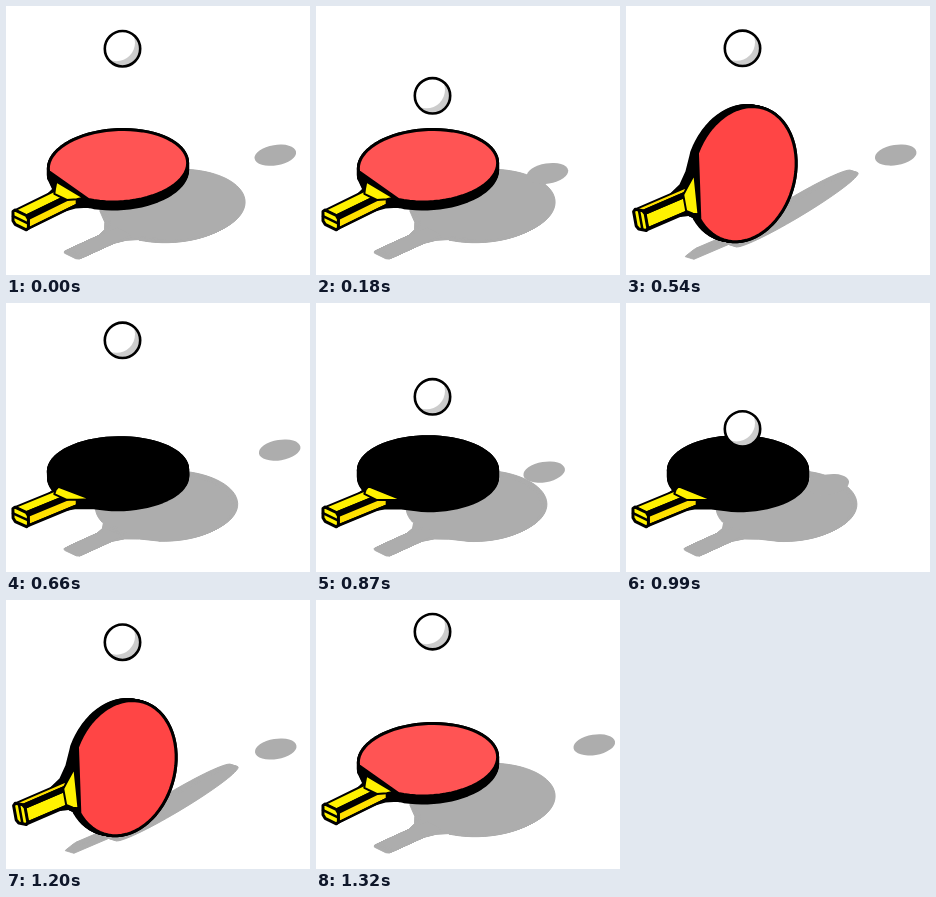
Recreate the animation shown at these times as an HTML page with a canvas. Size 304 px wide and 269 px high, loop 1350 ms.

```html
<!DOCTYPE html>
<html lang="en">
<head>
<meta charset="utf-8">
<title>Bouncing ball</title>
<style>
html, body { margin: 0; width: 100%; height: 100%; overflow: hidden; background: #fff; }
canvas { display: block; }
</style>
</head>
<body>
<canvas id="stage" width="304" height="269"></canvas>
<script>
const ctx = document.getElementById('stage').getContext('2d');
const LOOP = 1350, STEP = 30;
const SHADOW = '#adadad', YELLOW = '#fff200', GOLD = '#ffe000';
const GRAVITY = 0.00094, RADIUS = 70, HALF = 4.2, END = -139;
let angle = 0;

// Bat coordinates: u along the handle, v across it, w through the thickness.
function turn([u, v, w]) {
  const c = Math.cos(angle), s = Math.sin(angle);
  const lift = w + 0.032 * (u - END);
  return { u, side: v * c + lift * s, up: 0.84 * (lift * c - v * s) };
}
const bend = u => Math.min(0, u + RADIUS) * 0.045;

function toScreen(p) {
  const { u, side, up } = turn(p);
  return [112 + 0.7 * (u + side), 167 - 0.36 * u + 0.34 * side - up + bend(u)];
}

function toGround(p) {
  const { u, side, up } = turn(p);
  return [163.5 + 0.69 * (u + side) + 0.806 * up,
          201.4 - 0.36 * u + 0.34 * side - 0.39 * up + bend(u)];
}

// The round blade, cut straight where it meets the neck.
const blade = Array.from({ length: 61 }, (_, i) => {
  const a = (-140 + i * 5) * Math.PI / 180;
  return [RADIUS * 1.01 * Math.cos(a), RADIUS * Math.sin(a)];
});
const neck = [[-58, 36], [-66, 23], [-76, 15], [-90, 11], [-90, -11], [-76, -16], [-65, -27], [-57, -40]];
const body = [...blade, ...neck];
const grip = [[END + 2, -11], [-72, -11], [-72, 11], [END + 2, 11], [END, 8], [END, -8]];
const at = (shape, w) => shape.map(([u, v]) => [u, v, w]);

function draw(points, project, fill, stroke, width = 2.6) {
  ctx.beginPath();
  points.forEach(p => ctx.lineTo(...project(p)));
  ctx.closePath();
  if (fill) { ctx.fillStyle = fill; ctx.fill(); }
  if (stroke) { ctx.strokeStyle = stroke; ctx.lineWidth = width; ctx.stroke(); }
}

function isFront(points) {
  const [a, b, c] = points.slice(0, 3).map(toScreen);
  return (b[0] - a[0]) * (c[1] - a[1]) > (b[1] - a[1]) * (c[0] - a[0]);
}

function extrude(shape, depth, project, color, width) {
  for (let i = -4; i <= 4; i++) draw(at(shape, depth * i / 4), project, color, color, width);
}

// A bar with bevelled edges; the bevels stay black and read as thick outlines.
function drawHandle() {
  const near = END, far = -70, v = 11, w = 8.5, bevel = 3;
  const a = v - bevel, b = w - bevel;
  const ring = [[-a, w], [a, w], [v, b], [v, -b], [a, -w], [-a, -w], [-v, -b], [-v, b]];
  ring.forEach(([v0, w0], i) => {
    const [v1, w1] = ring[(i + 1) % 8];
    const face = [[near, v0, w0], [far, v0, w0], [far, v1, w1], [near, v1, w1]];
    if (!isFront(face)) return;
    const color = i % 2 ? '#000' : i % 4 ? GOLD : YELLOW;
    draw(face, toScreen, color, '#000', 2);
  });
  draw(ring.map(([x, y]) => [near, x, y]), toScreen, YELLOW, '#000', 3);
  draw([[near, -v, 0], [near, v, 0]], toScreen, null, '#000', 2.5);
}

function drawBat() {
  extrude(body, HALF, toScreen, '#000', 3);
  const redUp = isFront(at([[0, 0], [1, 0], [0, 1]], HALF));
  const top = redUp ? 1 : -1;
  drawHandle();
  draw(at([[-82, -9], [-74, -16], [-63, -25], [-67, 18], [-74, 15], [-82, 9]], top * HALF),
       toScreen, YELLOW, '#000', 2);
  const tone = Math.round(84 - 15 * Math.sin(angle));
  draw(at(blade, top * HALF), toScreen, redUp ? `rgb(255,${tone},${tone})` : '#000', '#000', 3);
}

function drawBall(y) {
  const x = 116.5, r = 17.7;
  const disc = (cx, cy, radius) => {
    ctx.beginPath();
    ctx.arc(cx, cy, radius, 0, 7);
  };
  ctx.save();
  disc(x, y, r);
  ctx.clip();
  ctx.fillStyle = '#ccc';
  ctx.fill();
  disc(x - 6, y - 6, 18.5);
  ctx.fillStyle = '#fff';
  ctx.fill();
  ctx.restore();
  disc(x, y, r);
  ctx.strokeStyle = '#000';
  ctx.lineWidth = 2.6;
  ctx.stroke();
}

function ballHeight(t) {
  const [peak, top] = t < 283 ? [-49, 40.5] : t < 961 ? [622, 36] : [1307, 31.5];
  return top + GRAVITY * (t - peak) ** 2;
}

function ease(t, start) {
  const x = Math.min(1, Math.max(0, (t - start) / 240));
  return x * x * (3 - 2 * x);
}

function render(now) {
  const t = Math.floor(now % LOOP / STEP) * STEP;
  const y = ballHeight(t);
  angle = Math.PI * (ease(t, 432) - ease(t, 1068));
  ctx.fillStyle = '#fff';
  ctx.fillRect(0, 0, 304, 269);
  ctx.lineJoin = 'round';
  ctx.lineCap = 'round';

  extrude(body, HALF, toGround, SHADOW, 1);
  extrude(grip, 5, toGround, SHADOW, 1);
  ctx.beginPath();
  ctx.ellipse(278 - 0.806 * (y - 32), 145 + 0.39 * (y - 32), 21, 10.2, -0.16, 0, 7);
  ctx.fillStyle = SHADOW;
  ctx.fill();

  drawBat();
  drawBall(y);
}

const begin = performance.now();
function tick() {
  render(performance.now() - begin);
  requestAnimationFrame(tick);
}
tick();
</script>
</body>
</html>
```
